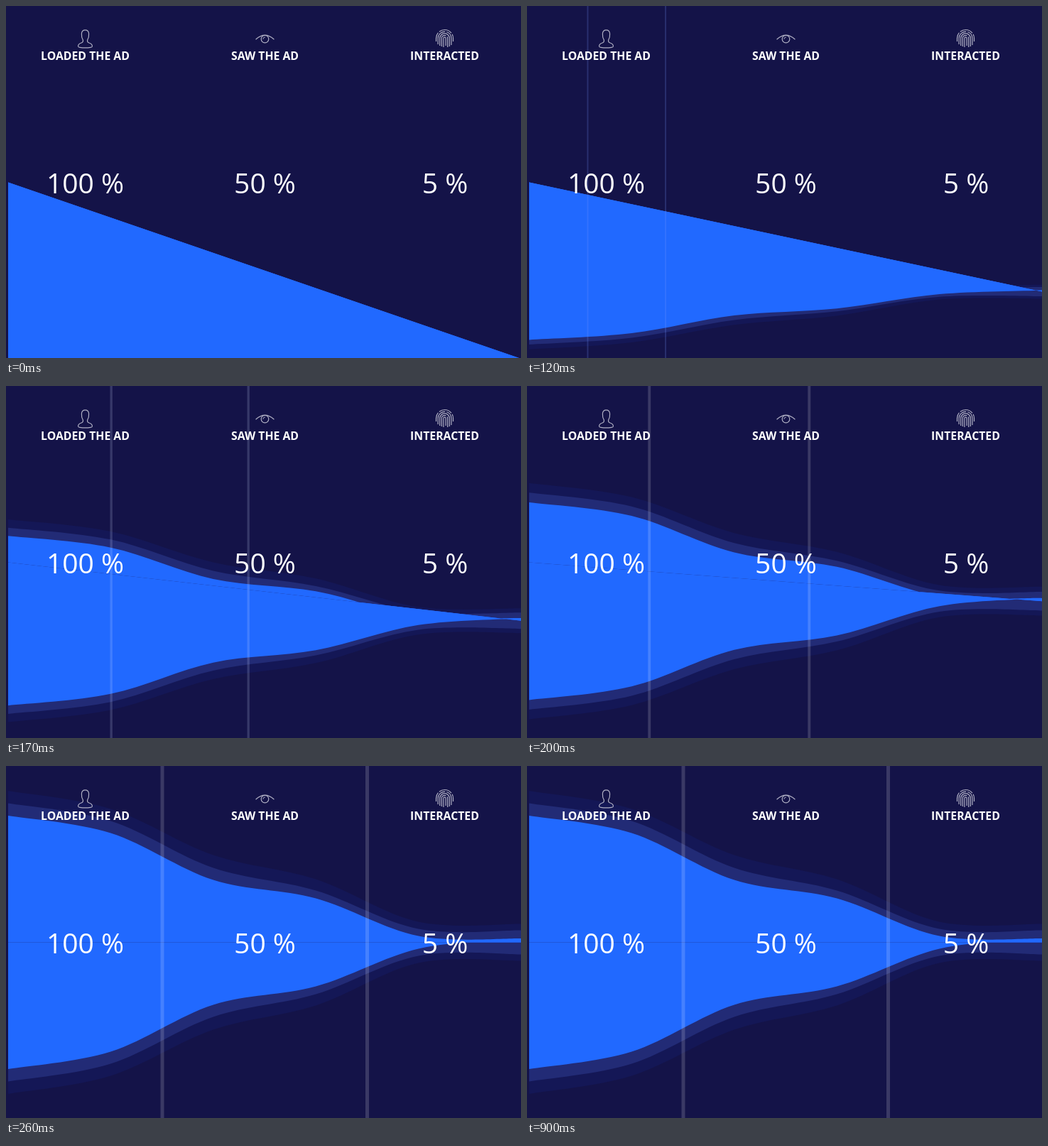
These frames come from a looping animation (725 by 496 pixels, 2.9 s). An HTML page with a canvas:

```html
<!DOCTYPE html>
<html lang="en">
<head>
<meta charset="utf-8">
<title>Ad funnel</title>
<style>
  html, body { margin: 0; width: 100%; height: 100%; overflow: hidden; background: #141348; }
  canvas, svg { position: absolute; left: 0; top: 0; width: 725px; height: 496px; }
  text { font-family: "Open Sans", "Noto Sans", sans-serif; fill: #fff; text-anchor: middle; }
  .label { font-size: 15.8px; font-weight: 700; }
  .value { font-size: 39px; }
  .icon { fill: none; stroke: #b0b0c4; stroke-width: 1.2; stroke-linecap: round; }
</style>
</head>
<body>
<canvas id="chart" width="725" height="496"></canvas>
<svg viewBox="0 0 725 496">
  <g class="icon">
    <path d="M108.2 47.5C106.6 45 106.2 42 106.4 39C106.6 35.6 108.4 33.8 111.5 33.8S116.4 35.6 116.6 39C116.8 42 116.4 45 114.8 47.5C114 50 114.6 51.2 117 52C120.6 53.2 121.6 54.6 121.4 57Q121.2 58 119 58.3Q111.5 59.4 104 58.3Q101.8 58 101.6 57C101.4 54.6 102.4 53.2 106 52C108.4 51.2 109 50 108.2 47.5Z"/>
    <path d="M352 46.8Q364.5 35.4 377 46.8"/>
    <circle cx="364.5" cy="46.6" r="5.3"/>
    <path d="M361.8 46.4A2.8 2.8 0 0 1 364.3 43.9" stroke-width="1"/>
  </g>
  <g class="icon" id="print"></g>
  <text class="label" x="111.5" y="76">LOADED THE AD</text>
  <text class="label" x="364.5" y="76">SAW THE AD</text>
  <text class="label" x="617.5" y="76">INTERACTED</text>
  <text class="value" x="111.5" y="264">100 %</text>
  <text class="value" x="364.5" y="264">50 %</text>
  <text class="value" x="618" y="264">5 %</text>
</svg>
<script>
const W = 725, H = 496, LEFT = 3, FLOOR = 497, MID = FLOOR / 2, LOOP = 2900;
const ctx = document.getElementById('chart').getContext('2d');

// Half-heights of each band at evenly spaced columns, outermost first.
const bands = [
  { color: '#141756', up: [213.5, 188, 123, 89, 29, 26] },
  { color: '#222b76', up: [196, 171, 105, 73, 19, 17] },
  { color: '#2169ff', up: [178.5, 154, 88, 62, 9, 5.5], lastDown: -5 }
];
for (const b of bands) {
  b.down = b.up.slice();
  if (b.lastDown !== undefined) b.down[5] = b.lastDown;
}

// [start time, progress] of each held pose
const poses = [[0, 0], [90, 0.168], [120, 0.38], [140, 0.558],
               [170, 0.669], [200, 0.78], [230, 0.89], [260, 1]];

function progress(t) {
  let p = 0;
  for (const [start, value] of poses) if (t >= start) p = value;
  return p;
}

// Catmull-Rom area growing from the floor; its first corner stays put.
function area(halves, sign, p, color) {
  const rise = y => FLOOR + (y - FLOOR) * p;
  const step = (W - LEFT) / (halves.length - 1);
  const pts = halves.map((h, i) => [LEFT + i * step, rise(MID - sign * h)]);
  const at = i => pts[Math.max(0, Math.min(pts.length - 1, i))];
  ctx.beginPath();
  ctx.moveTo(LEFT, MID);
  ctx.lineTo(...pts[0]);
  for (let i = 0; i < pts.length - 1; i++) {
    const [a, b, c, d] = [at(i - 1), at(i), at(i + 1), at(i + 2)];
    ctx.bezierCurveTo(
      b[0] + (c[0] - a[0]) / 6, b[1] + (c[1] - a[1]) / 6,
      c[0] - (d[0] - b[0]) / 6, c[1] - (d[1] - b[1]) / 6, c[0], c[1]);
  }
  ctx.lineTo(W, rise(MID));
  ctx.closePath();
  ctx.fillStyle = color;
  ctx.fill();
}

// Full-height bar that slides out from the left edge as it widens.
function divider(x, p) {
  const k = Math.max(0, Math.min(1, (p - 0.5) / 0.25));
  const tint = (a, b) => a + (b - a) * k;
  const alpha = tint(0.22, 0.16);
  ctx.fillStyle = `rgba(${tint(120, 255)},${tint(150, 255)},255,${alpha})`;
  ctx.fillRect(LEFT + (x - LEFT - 2.5) * p, 0, 5 * p, H);
}

function draw(t) {
  const p = progress(t);
  ctx.fillStyle = '#141348';
  ctx.fillRect(0, 0, W, H);
  for (const b of bands) {
    area(b.up, 1, p, b.color);
    area(b.down, -1, p, b.color);
  }
  if (p > 0) {
    divider(220, p);
    divider(508.5, p);
  }
}

// Fingerprint: nested arches [radius, left leg, right leg, dashes].
const ridges = [[12, 50, 50, '13 2 19 2'], [9.4, 54, 55, '24 2'], [6.8, 56, 57, 'none'],
                [4.2, 57, 58, '20 2'], [1.6, 58, 56, 'none']];
document.getElementById('print').innerHTML = ridges.map(([r, l, q, dash]) =>
  `<path stroke-dasharray="${dash}" stroke-linecap="butt"
    d="M${617.5 - r} ${l}V45.5A${r} ${r} 0 0 1 ${617.5 + r} 45.5V${q}"/>`).join('');

const start = performance.now();
function tick() {
  draw((performance.now() - start) % LOOP);
  requestAnimationFrame(tick);
}
tick();
</script>
</body>
</html>
```
